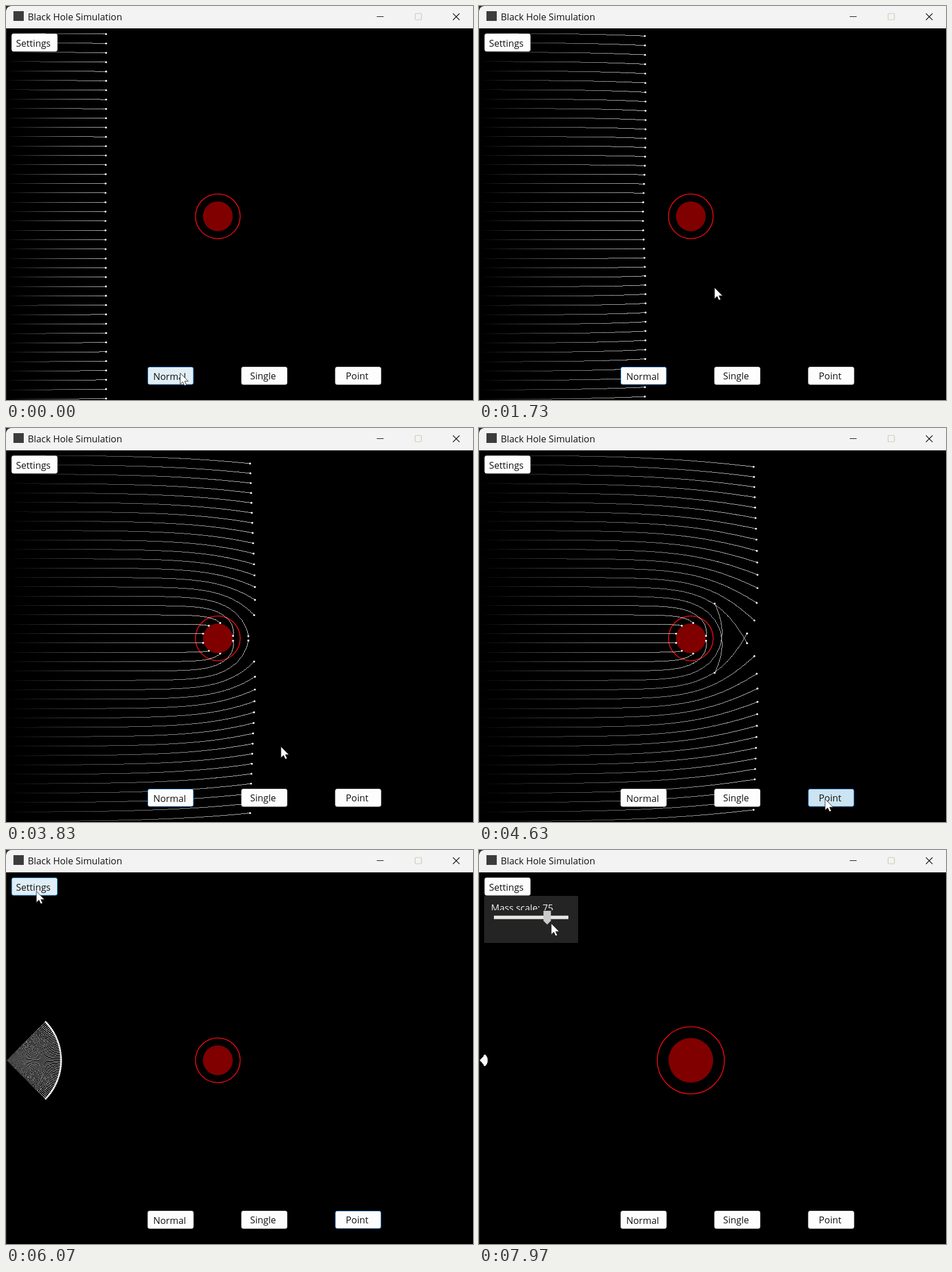
Recreate the animation shown at these times as an HTML page with a canvas. Size 815 by 687 pixels, loop 8 s.

```html
<!DOCTYPE html>
<html lang="en">
<head>
<meta charset="utf-8">
<title>Black Hole Simulation</title>
<style>
  html, body { margin: 0; width: 100%; height: 100%; overflow: hidden; background: #000; }
  canvas, svg { position: absolute; left: 0; top: 0; width: 815px; height: 687px; display: block; }
  text { font: 16.3px "Open Sans", "Noto Sans", sans-serif; fill: #111; white-space: pre; }
</style>
</head>
<body>
<canvas id="sky" width="815" height="687"></canvas>
<svg viewBox="0 0 815 687" xmlns="http://www.w3.org/2000/svg">
  <clipPath id="labelClip"><rect x="9" y="80" width="164" height="25"/></clipPath>
  <rect x="0" y="39" width="1" height="648" fill="#2b2b24"/>
  <rect width="815" height="39" fill="#26302a"/>
  <path d="M0 39V9Q1 1 9 0H815V39Z" fill="#f3f3f3"/>
  <rect x="13" y="9" width="18" height="17" fill="#3c3c3c"/>
  <text x="38" y="25">Black Hole Simulation</text>
  <g fill="none" stroke="#111" stroke-width="1.2">
    <path d="M647 18.5H659M780 13L791.500 24.500M791.500 13L780 24.500"/>
    <rect x="714" y="13" width="11" height="11" rx="1.500" stroke="#c6cbb0"/>
  </g>
  <g id="buttons"></g>
  <g id="panel">
    <rect x="9" y="80" width="164" height="82" fill="#242424"/>
    <g clip-path="url(#labelClip)"><text id="mass" x="21" y="107" style="fill:#f4f4f4"></text></g>
    <rect x="26" y="114.500" width="130" height="6" fill="#e7e7e3"/>
    <path id="thumb" d="M-6.500 106H6.500V123.500L0 130L-6.500 123.500Z"/>
  </g>
  <path id="cursor" d="M0 0V19.500L4.500 15.300L7.700 22L10.800 20.600L7.800 14.200H14Z" fill="#fff" stroke="#222" stroke-width="0.9"/>
</svg>
<script>
const LOOP = 8000, CX = 369.7, CY = 366.7, RS = 26;
const FAN_AT = 4650, PANEL_AT = 6250, GRAB_AT = 7180, DRAG_AT = 7250, DRAG_STEP = 21.6;
const SPEED = 0.065, SHADES = 28;
const $ = id => document.getElementById(id);
const ctx = $("sky").getContext("2d");

// Light path around the hole, one point per unit of path parameter
function trace(x, y, angle, count) {
  const sub = 8, h = 1 / sub, path = [[x, y]];
  let px = x - CX, py = y - CY, vx = Math.cos(angle), vy = Math.sin(angle);
  const L = px * vy - py * vx, k = 1.5 * RS * L * L;
  for (let i = 0; i < count; i++) {
    for (let j = 0; j < sub; j++) {
      px += vx * h / 2; py += vy * h / 2;
      const a = -k * h / Math.hypot(px, py) ** 5;
      vx += a * px; vy += a * py;
      px += vx * h / 2; py += vy * h / 2;
      if (Math.hypot(px, py) < RS + 1) {
        path.push([px + CX, py + CY]);
        return path;
      }
    }
    path.push([px + CX, py + CY]);
  }
  return path;
}

const rows = Array.from({ length: 40 }, (_, i) => trace(1, CY + (i - 19.5) * 16.35, 0, 480));
const fan = Array.from({ length: 50 }, (_, i) => trace(1.5, CY, (i / 49 - 0.5) * Math.PI / 2, 180));

const rowKeys = [[0, 172.5], [1730, 285], [3000, 364], [4650, 471]];
const fanKeys = [[FAN_AT, 0], [6070, 94.5], [6770, 138.5], [7280, 171.5]];
const cursorKeys = [
  [0, 304, 640], [350, 304, 640], [1300, 411, 491], [1800, 411, 491], [2500, 425, 515],
  [3500, 425, 515], [4400, 604, 647], [5080, 604, 647], [5950, 53, 72], [6300, 53, 72],
  [6750, 69, 102], [6800, 69, 102], [7100, 98, 122], [DRAG_AT, 98, 122], [7790, 126, 128]
];

const clamp = (v, lo, hi) => Math.min(hi, Math.max(lo, v));
const linear = u => u;
const smooth = u => u * u * (3 - 2 * u);

function sample(keys, t, ease = linear) {
  let i = 0;
  while (i < keys.length - 2 && t > keys[i + 1][0]) i++;
  const a = keys[i], b = keys[i + 1];
  const u = ease(clamp((t - a[0]) / (b[0] - a[0]), 0, 1));
  return a.slice(1).map((v, n) => v + (b[n + 1] - v) * u);
}

function pointAt(path, s) {
  const i = Math.min(Math.floor(s), path.length - 2), u = s - i;
  const [a, b] = [path[i], path[i + 1]];
  return [a[0] + (b[0] - a[0]) * u, a[1] + (b[1] - a[1]) * u];
}

const snap = v => Math.floor(v) + 0.5;

function drawRay(path, dist) {
  const end = Math.min(dist, path.length - 1);
  for (let j = 0; j < SHADES; j++) {
    const s0 = end * j / SHADES, s1 = end * (j + 1) / SHADES;
    ctx.globalAlpha = (j + 0.5) / SHADES;
    ctx.beginPath();
    ctx.moveTo(...pointAt(path, s0).map(snap));
    for (let i = Math.floor(s0) + 1; i < s1; i++) ctx.lineTo(snap(path[i][0]), snap(path[i][1]));
    ctx.lineTo(...pointAt(path, s1).map(snap));
    ctx.stroke();
  }
  ctx.globalAlpha = 1;
  const [x, y] = pointAt(path, end);
  ctx.beginPath();
  ctx.arc(x, y, 1.7, 0, 7);
  ctx.fill();
}

function drawSky(rays, dist, mass) {
  const r = RS * mass / 50;
  ctx.fillStyle = "#000";
  ctx.fillRect(0, 0, 815, 687);
  ctx.fillStyle = "#800000";
  ctx.beginPath();
  ctx.arc(CX, CY, r, 0, 7);
  ctx.fill();
  ctx.strokeStyle = "#e60a12";
  ctx.lineWidth = 1.6;
  ctx.beginPath();
  ctx.arc(CX, CY, r * 1.5, 0, 7);
  ctx.stroke();
  ctx.strokeStyle = ctx.fillStyle = "#fff";
  ctx.lineWidth = 1;
  for (const ray of rays) drawRay(ray, dist);
}

function addButton(label, x, y, tx, ty) {
  const g = document.createElementNS("http://www.w3.org/2000/svg", "g");
  g.innerHTML = `<rect x="${x}" y="${y}" width="79.500" height="30.500" rx="3"/>` +
    `<text x="${tx}" y="${ty}">${label}</text>`;
  $("buttons").append(g);
  const box = g.firstChild;
  return (fill, border) => {
    box.setAttribute("fill", fill);
    box.setAttribute("stroke", border);
  };
}

const settings = addButton("Settings", 10, 48.5, 17.5, 71);
const normal = addButton("Normal", 247.5, 629.5, 257, 651.5);
const single = addButton("Single", 411, 629.5, 426, 651);
const point = addButton("Point", 574.8, 629.5, 593, 650.5);
const PLAIN = "#fdfdfd", HOVER = "#e0eef6", DOWN = "#cce4f2", EDGE = "#d0d0d0", FOCUS = "#1c6fb8";

function render(t) {
  const step = clamp(Math.floor((t - DRAG_AT) / DRAG_STEP), 0, 25);
  const mass = 50 + step;
  if (t < FAN_AT) drawSky(rows, sample(rowKeys, t)[0], mass);
  else if (!step) drawSky(fan, sample(fanKeys, t)[0], mass);
  else drawSky(fan, (t - DRAG_AT - step * DRAG_STEP) * SPEED, mass);

  const [x, y] = sample(cursorKeys, t, smooth);
  $("cursor").setAttribute("transform", `translate(${x} ${y})`);
  const over = (bx, by) => x >= bx && x <= bx + 80 && y >= by && y <= by + 31;

  const open = t >= PANEL_AT;
  const onSettings = over(10, 48);
  settings(onSettings ? HOVER : PLAIN, onSettings || open && t < GRAB_AT ? "#2a8fd0" : EDGE);
  normal(over(247, 629) ? HOVER : PLAIN, t < FAN_AT - 50 ? FOCUS : EDGE);
  single(over(411, 629) ? HOVER : PLAIN, EDGE);
  const pressed = t > FAN_AT - 80 && t < FAN_AT + 30;
  point(pressed ? DOWN : over(574, 629) ? HOVER : PLAIN, t >= FAN_AT - 50 && !open ? FOCUS : EDGE);

  $("panel").style.display = open ? "" : "none";
  $("mass").textContent = "Mass scale: " + mass;
  $("thumb").setAttribute("transform", `translate(${90.5 + step * 1.14} 0)`);
  $("thumb").setAttribute("fill", t >= GRAB_AT ? "#cacaca" : "#0078d7");
}

const start = performance.now();
function tick() {
  render((performance.now() - start) % LOOP);
  requestAnimationFrame(tick);
}
tick();
</script>
</body>
</html>
```
